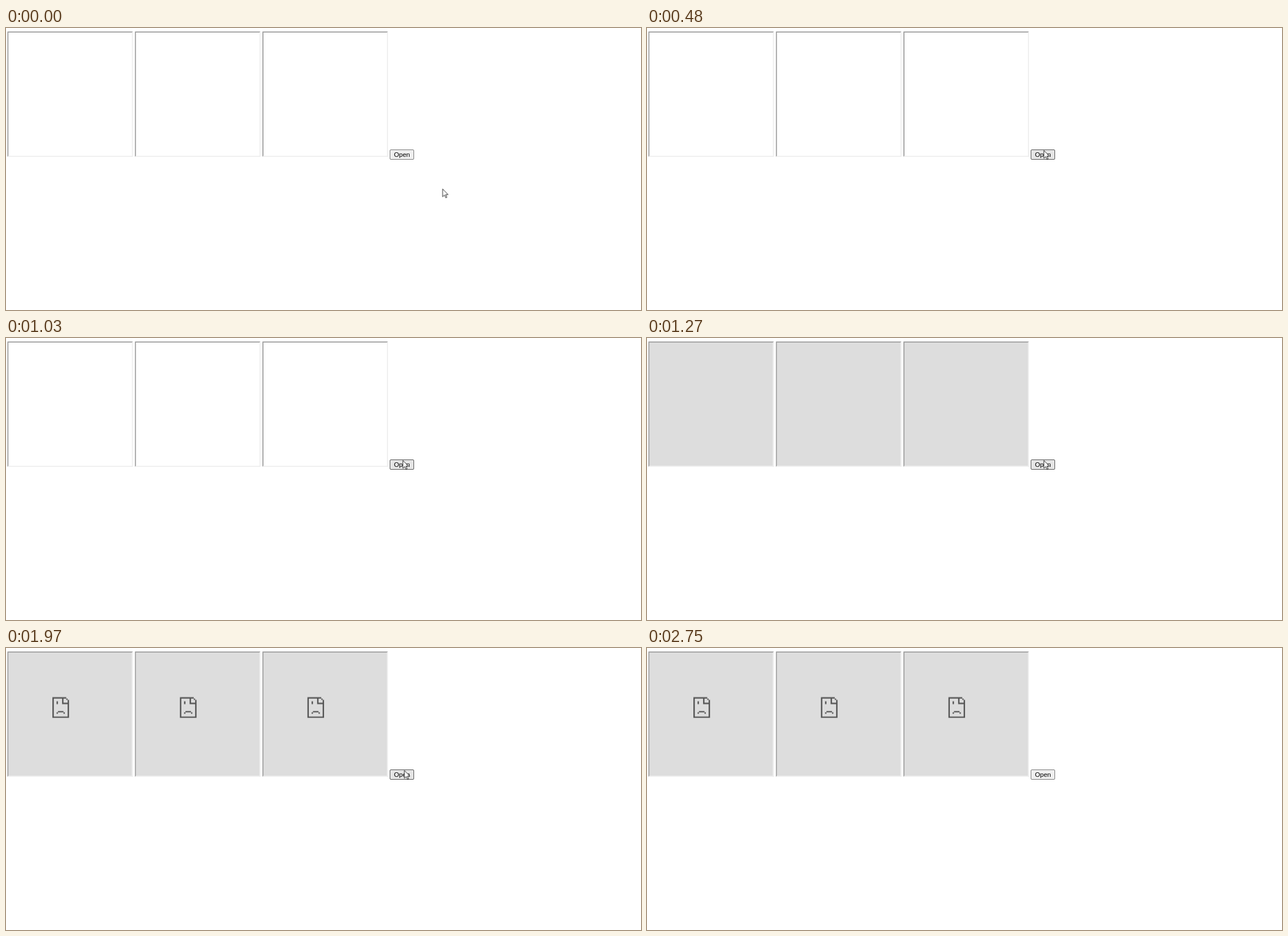
An HTML page for the animation above (3850 ms loop, 1122 by 499 pixels).

```html
<!DOCTYPE html>
<html lang="en">
<head>
<meta charset="utf-8">
<style>
  html, body { margin: 0; width: 100%; height: 100%; overflow: hidden; background: #fff; }
  svg { display: block; }
  .page, .icons, .button, .cursor { animation: 3850ms step-end infinite; }

  .page { animation-name: crash; }
  @keyframes crash {
    0% { fill: #fff; }
    32.98%, 100% { fill: #ddd; }
  }

  .icons { fill: #535353; animation-name: appear; }
  @keyframes appear {
    0% { opacity: 0; }
    35.06%, 100% { opacity: 1; }
  }

  .button { animation-name: press; }
  @keyframes press {
    0%, 53.24%, 100% { fill: #efefef; stroke: #767676; }
    8.31%, 26.75% { fill: #e5e5e5; stroke: #4f4f4f; }
    22.85% { fill: #f5f5f5; stroke: #8d8d8d; }
  }
  text { font: 11.64px "Liberation Sans", Arial, sans-serif; }

  .cursor { fill: #fff; stroke: #000; animation-name: point; }
  @keyframes point {
    0% { transform: translate(771px, 284.3px) scale(.8733); }
    2.07% { transform: translate(767px, 280px) scale(.8733); }
    4.15% { transform: translate(752px, 265px) scale(.8733); }
    6.23% { transform: translate(733px, 246px) scale(.8733); }
    8.31% { transform: translate(715px, 230px) scale(.8733); }
    10.38% { transform: translate(704px, 219px) scale(.8733); }
    12.46% { transform: translate(700.8px, 216.2px) scale(.8733); }
    51.16% { transform: translate(703.4px, 216.2px) scale(.8733); }
    53.24% { transform: translate(905px, 312px) scale(.8733); }
    55.84% { transform: translate(1119px, 452px) scale(.8733); }
    61.55% { transform: translate(1119.2px, 458px) scale(.8733); }
    63.63% { transform: translate(1101px, 481px) scale(.8733); }
    65.71% { transform: translate(1063px, 496px) scale(.8733); }
    71.42%, 100% { transform: translate(1200px, 600px) scale(.8733); }
  }
</style>
</head>
<body>
<svg width="1122" height="499" viewBox="0 0 1122 499">
  <defs>
    <g id="border">
      <path fill="#9a9a9a" d="M0 0H254L252 2H2V252L0 254z"/>
      <path fill="#eee" d="M254 254V0L252 2V252H2L0 254z"/>
    </g>
    <!-- sad page, one unit per square -->
    <path id="sad" transform="translate(91 92.5) scale(2.8)" fill-rule="evenodd"
      d="M0 0H10V1H8V4H12V15H0zM1 1V14H11V5H7V1z
         M10 1h1v1h-1zM11 2h1v2h-1z
         M3 3h1v2h-1z
         M4 10h4v1h-4zM3 11h1v1h-1zM8 11h1v1h-1z"/>
  </defs>
  <g transform="translate(2.5 6.2) scale(.8733)">
    <path class="page" d="M2 2h250v250h-250zM260 2h250v250h-250zM518 2h250v250h-250z"/>
    <use href="#border"/>
    <use href="#border" x="258"/>
    <use href="#border" x="516"/>
    <g class="icons">
      <use href="#sad"/>
      <use href="#sad" x="258"/>
      <use href="#sad" x="516"/>
    </g>
  </g>
  <rect class="button" x="678.5" y="215.5" width="42" height="17" rx="1.5"/>
  <text x="685.4" y="228">Open</text>
  <path class="cursor" d="M.5 .5V16.5L4.3 12.9L6.9 18.5L9.2 17.5L6.7 12H11.6z"/>
</svg>
</body>
</html>
```
